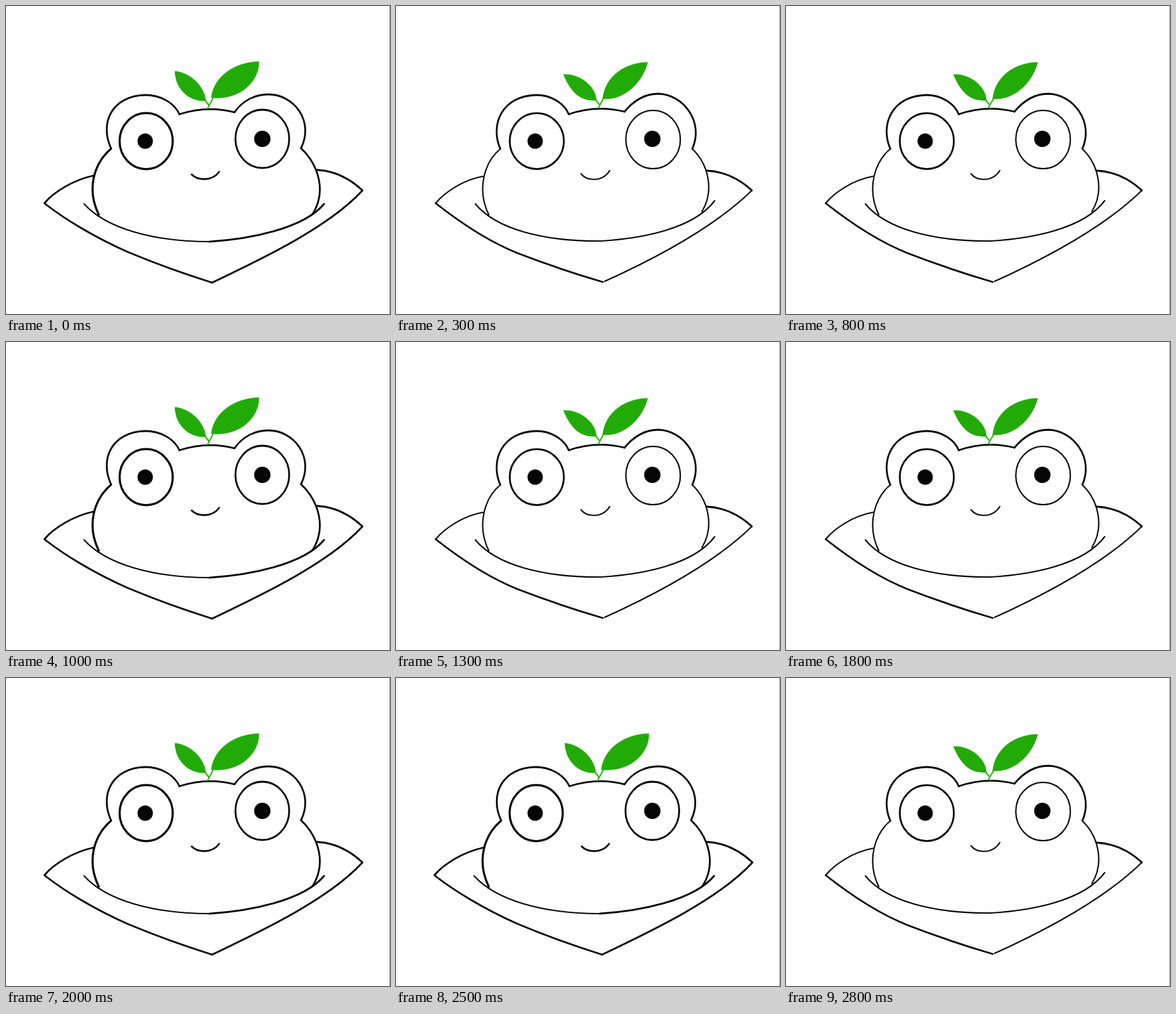
These frames come from a looping animation (600 by 481 pixels, 3 s). An HTML page:

```html
<!DOCTYPE html>
<html lang="en">
<head>
<meta charset="utf-8">
<title>Frog with a sprout</title>
<style>
  html, body { margin: 0; height: 100%; overflow: hidden; background: #fff; }
  svg { display: block; width: 100%; height: 100%; }
  .ink { fill: none; stroke: #050505; stroke-width: 2.8; stroke-linecap: round; stroke-linejoin: round; }
  .thin { stroke-width: 2.1; }
  .bold { stroke-width: 3.3; }
  .leaf { fill: #22ab06; stroke: #22ab06; stroke-width: 1; stroke-linejoin: round; }
  .stem { fill: none; stroke: #2fb512; stroke-width: 2.2; stroke-linecap: round; }
</style>
</head>
<body>
<svg viewBox="0 0 600 481">
  <g id="rest">
    <g class="ink">
      <path d="M164 222C146 183 165 140 218 139C240 139 262 150 271 169"/>
      <path d="M271 169Q315 155 357 166"/>
      <path d="M357 166C370 147 390 138 410 138C450 138 482 180 461 222"/>
      <path class="bold" d="M164 223C138 245 125 285 145 326"/>
      <path d="M461 222C489 249 501 290 479 325"/>
      <path d="M136 265C105 272 75 290 60 308C90 332 140 362 190 384Q252 410 322 432"/>
      <path d="M322 432C400 395 505 345 557 288Q525 258 486 256"/>
      <path class="thin" d="M122 309C156 347 230 368 318 368"/>
      <path d="M318 368C380 364 465 348 497 309"/>
      <path d="M290 263C300 273 322 274 333 259"/>
      <ellipse class="bold" cx="219" cy="211" rx="41.5" ry="43.8"/>
      <ellipse cx="400.5" cy="207.5" rx="42" ry="45.5"/>
    </g>
    <path class="leaf" d="M264 102C285 104 309 122 312 148C290 149 266 135 264 102Z"/>
    <path class="leaf" d="M395 87C395 119 365 147 321 143C325 110 357 88 395 87Z"/>
    <path class="stem" d="M315 160L324 143M317 155L311 147"/>
  </g>

  <g id="smile">
    <g class="ink">
      <path d="M163 223C146 184 167 140 219 139C242 139 262 151 270 169"/>
      <path d="M270 169Q313 154 357 165"/>
      <path d="M357 165C372 147 390 137 410 137C448 138 482 180 463 223"/>
      <path class="thin" d="M163 223C139 243 125 285 145 326"/>
      <path class="thin" d="M463 223C488 247 498 288 478 321"/>
      <path class="thin" d="M136 266C105 271 75 292 62 308"/>
      <path d="M62 308C95 334 140 366 190 386Q255 411 323 431"/>
      <path class="thin" d="M326 430C410 392 500 343 556 288"/>
      <path d="M556 288Q525 259 485 257"/>
      <path class="thin" d="M124 309C156 348 230 368 320 367C385 363 465 348 498 304"/>
      <path class="thin" d="M289 262C299 274 323 275 334 257"/>
      <ellipse cx="220" cy="211" rx="42.3" ry="43.6"/>
      <ellipse class="thin" cx="401.7" cy="208.5" rx="42.6" ry="45.5"/>
    </g>
    <path class="leaf" d="M262 107C285 106 311 123 313 147C285 149 272 131 262 107Z"/>
    <path class="leaf" d="M393 88C386 116 360 147 323 145C327 110 357 89 393 88Z"/>
    <path class="stem" d="M316 159L324 145M317 153L312 147"/>
  </g>

  <circle cx="217.5" cy="211" r="12" fill="#050505"/>
  <circle cx="400.5" cy="207.5" r="12.8" fill="#050505"/>
  <rect x="599" width="1" height="481" fill="#a0a0a0"/>
</svg>
<script>
  const CYCLE = 500, REST = 300;
  const rest = document.getElementById("rest");
  const smile = document.getElementById("smile");

  function draw() {
    const resting = performance.now() % CYCLE < REST;
    rest.style.display = resting ? "" : "none";
    smile.style.display = resting ? "none" : "";
    requestAnimationFrame(draw);
  }
  draw();
</script>
</body>
</html>
```
